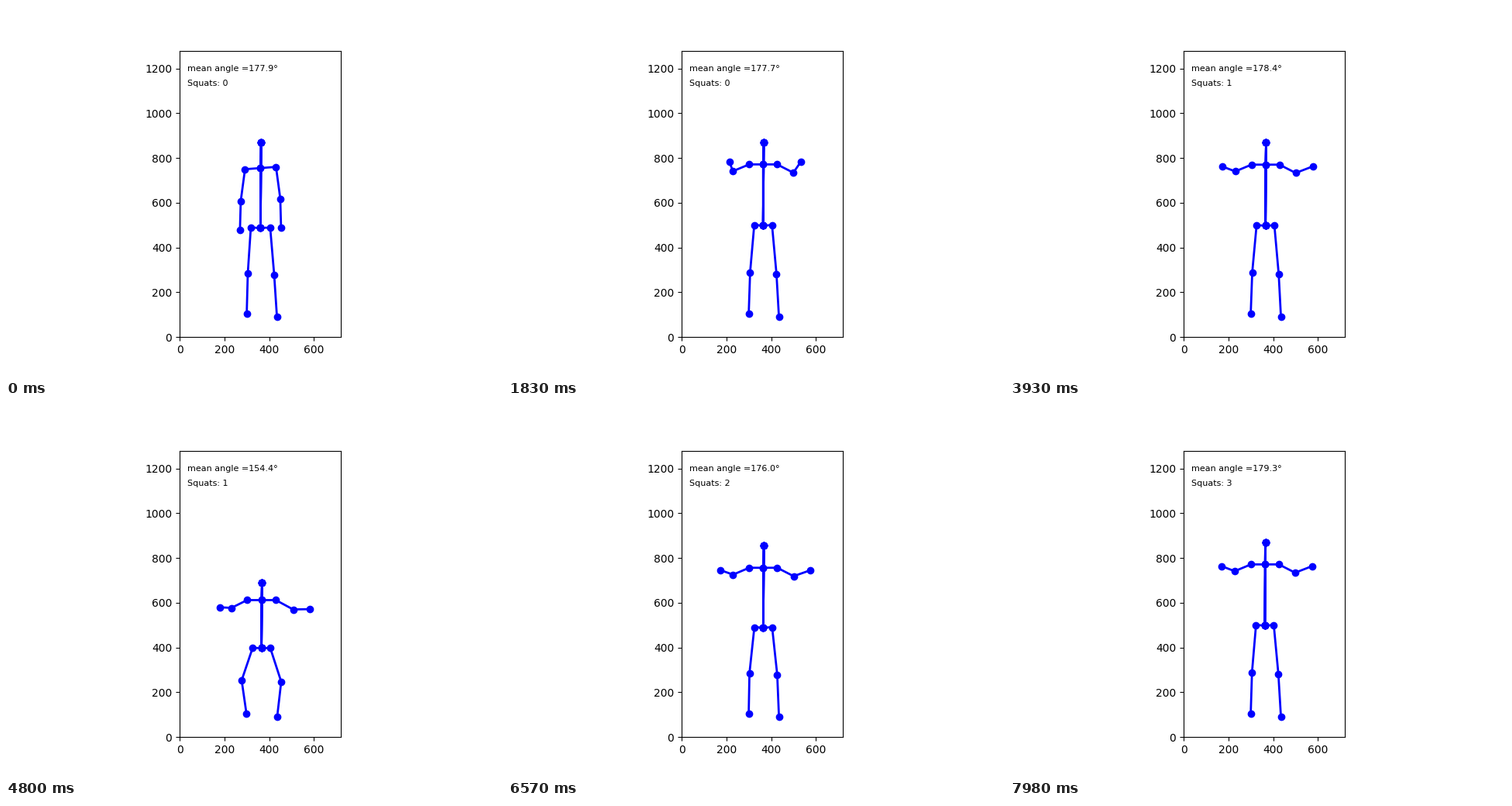
Write a matplotlib script that moves like this. It is 640x480 px and loops after 8 s.

```python
import math
import numpy as np
import matplotlib.pyplot as plt
from matplotlib.animation import FuncAnimation

LOOP, FRAMES, STEP = 8000, 267, 30
SCALE = 369.6 / 1280          # pixels per data unit
MID_X = 330                   # body axis in stage pixels

# Half figures: distance from the body axis and height of each joint, in pixels
JOINTS = ["head", "shoulder", "elbow", "wrist", "hip", "knee", "ankle"]
REST = np.array([(0, 176), (20, 209.5), (25.5, 250.5), (26.5, 287.5),
                 (12.5, 286.5), (17, 346), (19.5, 399.7)])
RAISED = np.array([(0, 176), (18, 204.8), (39, 214.5), (46, 201.5),
                   (11.5, 283.3), (17, 345), (19.5, 399.7)])
SQUAT = np.array([(0, 270.5), (19, 288.5), (40.5, 300.7), (58, 305.7),
                  (11.3, 336.6), (28.2, 358.5), (20, 399.7)])
REACH = np.array([12.5, 5.5])  # wrist travel as the forearms open outwards

# time, squat depth, sideways sway, mean knee angle
KEYS = np.array([
    (0, 0, -1.2, 177.9), (720, 0, -0.8, 178.4), (1830, 0, -0.4, 177.7),
    (2400, 0, 0, 177.2), (3120, 0.98, 3.8, 129.7), (3960, 0, 0, 178.6),
    (4440, 0, -0.2, 177.3), (4800, 0.55, 0, 154.4), (5130, 1, 0.5, 131),
    (5820, 0.09, -1.7, 174.3), (6000, 0, -1.5, 177.8), (6480, 0, -0.5, 178.3),
    (7140, 1.02, 1.3, 133.3), (7980, 0, -0.7, 179.3)])
TIMES, VALUES = KEYS[:, 0], KEYS[:, 1:]
STAND_UPS = (3620, 5655, 7690)

# Monotone cubic slopes: flat at turning points, harmonic mean elsewhere
secant = np.diff(VALUES, axis=0) / np.diff(TIMES)[:, None]
a, b = secant[:-1], secant[1:]
same = a * b > 0
SLOPES = np.zeros_like(VALUES)
SLOPES[1:-1] = np.where(same, 2 * a * b / np.where(same, a + b, 1), 0)


def state_at(t):
    """Depth, sway and knee angle at time t."""
    i = min(np.searchsorted(TIMES, t, side="right") - 1, len(TIMES) - 2)
    h = TIMES[i + 1] - TIMES[i]
    u = min((t - TIMES[i]) / h, 1)
    v = 1 - u
    return (v * v * (1 + 2 * u) * VALUES[i] + u * u * (1 + 2 * v) * VALUES[i + 1]
            + h * u * v * (v * SLOPES[i] - u * SLOPES[i + 1]))


def ease(t, start, end):
    u = min(max((t - start) / (end - start), 0), 1)
    return u * u * (3 - 2 * u)


def skeleton(t, depth, sway):
    """Joint positions in data units."""
    arm = ease(t, 720, 1530)
    reach = ease(t, 1830, 2500)

    bend = np.full((7, 1), depth)
    bend[5] = math.sin(math.pi / 2 * depth)      # knees open early
    stand = RAISED.copy()
    stand[3] += REACH * reach
    half = REST + arm * (stand - REST) + bend * (SQUAT - stand)
    half[3, 0] += 14 * math.sin(math.pi * arm)   # arms swing out while rising

    tilt = 1.5 * (arm - 1)
    drop = [0, tilt, tilt + arm, tilt + 2.2 * depth, 0, 0.9, 1.9]
    shift = [sway + 0.8, sway, sway + 2 * depth, sway + 2.5 * arm + 3 * depth,
             sway, sway / 2, 0.5]

    at = {}
    for name, (w, y), dy, dx in zip(JOINTS, half, drop, shift):
        for side in (-1, 1):
            px, py = MID_X + dx + side * w - 0.4, y + side * dy - 0.4
            at[name, side] = np.array([px - 224.05, 427.2 - py]) / SCALE
    at["head"] = at["head", 1]
    at["neck"] = (at["shoulder", -1] + at["shoulder", 1]) / 2
    at["pelvis"] = (at["hip", -1] + at["hip", 1]) / 2
    return at


def limbs(centre, *names):
    """Chain from the left end through the centre to the right end."""
    return ([(n, -1) for n in reversed(names)] + [centre]
            + [(n, 1) for n in names])


CHAINS = [["head", "pelvis"]] * 4 + [
    ["head", "neck", "pelvis"],
    limbs("neck", "shoulder", "elbow", "wrist"),
    limbs("pelvis", "hip", "knee", "ankle"),
]

fig, ax = plt.subplots(figsize=(6.4, 4.8), dpi=100)
ax.set_aspect("equal")
ax.set_xlim(0, 720)
ax.set_ylim(0, 1280)
ax.set_xticks(range(0, 601, 200))
ax.set_yticks(range(0, 1201, 200))

lines = [ax.plot([], [], "bo-", lw=2, ms=6)[0] for _ in CHAINS]
angle_text = ax.text(0.05, 0.928, "", fontsize=8, transform=ax.transAxes)
count_text = ax.text(0.05, 0.877, "", fontsize=8, transform=ax.transAxes)


def update(n):
    t = n * STEP
    depth, sway, angle = state_at(t)
    at = skeleton(t, depth, sway)
    for line, chain in zip(lines, CHAINS):
        line.set_data(*np.array([at[j] for j in chain]).T)
    angle_text.set_text(f"mean angle ={angle:.1f}°")
    count_text.set_text(f"Squats: {sum(t >= s for s in STAND_UPS)}")
    return [*lines, angle_text, count_text]


anim = FuncAnimation(fig, update, frames=FRAMES, interval=LOOP / FRAMES,
                     repeat=True, repeat_delay=0, blit=False)
plt.show()
```
